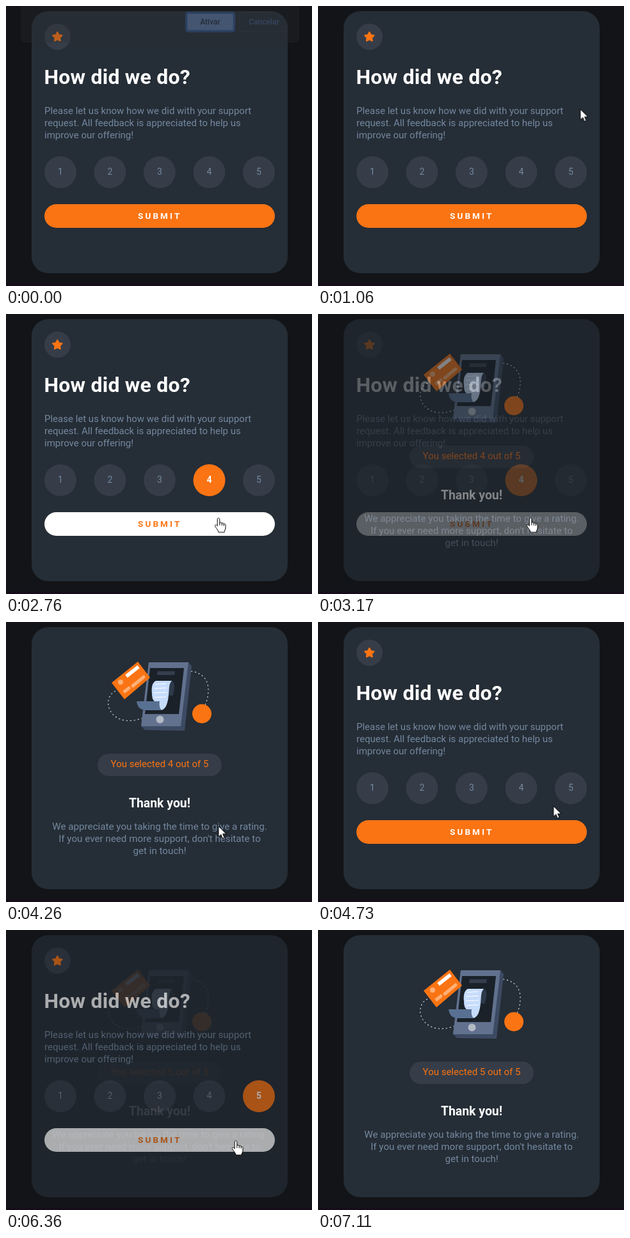
Recreate the animation shown at these times as an HTML page. Size 478x438 px, loop 7.52 s.

```html
<!DOCTYPE html>
<html lang="en">
<head>
<meta charset="utf-8">
<title>Rating card</title>
<style>
  html, body { margin: 0; width: 100%; height: 100%; overflow: hidden; background: #121417; }
  svg { display: block; width: 478px; height: 438px; font-family: Roboto, "Open Sans", sans-serif; font-size: 15px; }
  .card { fill: #252d36; }
  .chip { fill: #363d48; }
  .orange { fill: #fb7413; }
  .body { fill: #74889f; }
  .mid { text-anchor: middle; }
  .num { fill: #74889f; font-size: 14px; text-anchor: middle; }
  .bold { fill: #fff; font-weight: 700; }
  .peach { stroke: #ffb077; stroke-width: 5; stroke-linecap: round; }
  .dots { fill: none; stroke: #d5dde8; stroke-width: 1.1; stroke-dasharray: 2.2 3.8; }
  .pointer path { fill: #fff; stroke: #000; stroke-linejoin: round; }
  #thanks { opacity: 0; }
</style>
</head>
<body>
<svg viewBox="0 0 478 438">
  <rect width="478" height="438" fill="#121417"/>
  <rect y="434" width="478" height="4" fill="#180d1b"/>

  <g id="rating">
    <rect class="card" x="40" y="8" width="400" height="410" rx="26"/>
    <circle class="chip" cx="80.5" cy="48" r="20.5"/>
    <polygon id="star" class="orange" stroke="#fb7413" stroke-width="2" stroke-linejoin="round"/>
    <text class="bold" x="59.5" y="122" font-size="32" letter-spacing=".2">How did we do?</text>
    <g class="body">
      <text x="60" y="169">Please let us know how we did with your support</text>
      <text x="60" y="188">request. All feedback is appreciated to help us</text>
      <text x="60" y="207">improve our offering!</text>
    </g>
    <g id="scores"></g>
    <rect id="bar" class="orange" x="60" y="310" width="360" height="37" rx="18.5"/>
    <text id="label" class="bold" x="206" y="332.5" font-size="13.5" letter-spacing="3.1">SUBMIT</text>
  </g>

  <g id="thanks">
    <rect class="card" x="40" y="8" width="400" height="410" rx="26"/>
    <path class="dots" d="M171 108C160 113 157 127 162 137C169 152 188 160 214 150"/>
    <path class="dots" d="M289 77C307 79 316 91 316 106C316 116 314 123 311 130"/>
    <path fill="#3d4a63" d="M223 63H285L290 69L279 170L217 169L211 163Z"/>
    <path fill="#61718e" d="M223 63H285L273 163H211Z"/>
    <path fill="#1a2129" d="M225 72H278L270 144H217Z"/>
    <path fill="#343e4d" d="M237 77H264L263 83H236Z"/>
    <circle cx="240.5" cy="152.5" r="6" fill="#b2bac6"/>
    <path fill="#2d394a" d="M254 92C261 90 264 95 263 104L261 115H251Z"/>
    <path fill="#c6dcfb" d="M234 92H259C254 97 255 105 254 114C253 126 250 137 242 138H232V124C229 122 228 117 228 112C227 103 228 95 234 92Z"/>
    <path stroke="#fff" stroke-width="1.2" d="M233 97.5L250 96.5M231 104L251 103M231 111L251 110M232 118L250 117"/>
    <path fill="#587092" d="M204 124H240C239 130 240 135 243 138H219C210 138 205 133 204 124Z"/>
    <path class="orange" d="M165 95L206 62L225 87L185 121Z"/>
    <path stroke="#fff" stroke-width="5.5" d="M188 85L207 70"/>
    <circle cx="179" cy="94" r="4" fill="#ffb077"/>
    <path class="peach" d="M185.5 108.5L192 103.5M198 100L215 86"/>
    <circle class="orange" cx="306" cy="143.5" r="15"/>
    <rect class="chip" x="143" y="206" width="194" height="35" rx="17.5"/>
    <text id="pick4" class="orange mid" x="240" y="227">You selected 4 out of 5</text>
    <text id="pick5" class="orange mid" x="240" y="227">You selected 5 out of 5</text>
    <text class="bold mid" x="240" y="290" font-size="19.4">Thank you!</text>
    <g class="body mid" font-size="15.2">
      <text x="240" y="325">We appreciate you taking the time to give a rating.</text>
      <text x="240" y="344">If you ever need more support, don't hesitate to</text>
      <text x="240" y="363">get in touch!</text>
    </g>
  </g>

  <g id="dialog" font-size="12" text-anchor="middle">
    <rect x="23" y="-8" width="435" height="65" rx="5" fill="#2c2d30"/>
    <rect x="281.5" y="10.5" width="75" height="29" rx="3" fill="#8ab4f8" stroke="#3c6cc0" stroke-width="3.5"/>
    <text x="319" y="29" fill="#202a40" font-weight="500">Ativar</text>
    <rect x="365" y="10" width="75" height="30" rx="3" fill="none" stroke="#3b4048"/>
    <text x="403" y="29" fill="#5a80c8" font-weight="500">Cancelar</text>
  </g>

  <g id="cursor" class="pointer">
    <path id="arrow" d="M0 0V16.5L3.8 13L6.4 19L9.2 17.8L6.6 12H12Z"/>
    <g id="hand">
      <path d="M-1.8 1.5C-1.8-.8 1.8-.8 1.8 1.5V7C3 6 5 6.3 5.2 8C6.5 7 8 7.5 8.2 9C9.6 8.2 11 9 11 10.5V15C11 18 9 19 9 22H0C0 19-3 16.5-5.5 12.5C-6.5 10.5-4 9.5-2.8 11L-1.8 12.2Z"/>
      <path d="M1.8 7V11M5.2 8V11.5M8.2 9V12"/>
    </g>
  </g>
</svg>

<script>
const LOOP = 7520, RESET = 4390;
const GREY = '#363d48', INK = '#74889f', ORANGE = '#fb7413', WHITE = '#ffffff';
const $ = id => document.getElementById(id);

// rows: [time in ms, value, easing to the next row]
function track(el, prop, rows) {
  const last = rows[rows.length - 1];
  const frames = [...rows, [LOOP, last[1]]].map(([t, v, easing = 'linear']) =>
    ({ offset: t / LOOP, [prop]: v, easing }));
  el.animate(frames, { duration: LOOP, iterations: Infinity });
}

const steps = (el, prop, rows) => track(el, prop, rows.map(([t, v]) => [t, v, 'step-end']));

$('star').setAttribute('points', Array.from({ length: 10 }, (_, i) => {
  const r = i % 2 ? 4 : 7.6, a = (i / 5 - .5) * Math.PI;
  return [80.3 + r * Math.cos(a), 48.4 + r * Math.sin(a)].map(n => n.toFixed(2));
}).join(' '));

$('scores').innerHTML = [1, 2, 3, 4, 5].map(n => {
  const x = 7.5 + 77.5 * n;
  return `<circle id="dot${n}" class="chip" cx="${x}" cy="260" r="25"/>
    <text id="num${n}" class="num" x="${x}" y="263.5">${n}</text>`;
}).join('');

function select(n, start, end, reset) {
  const lit = (el, prop, off, on) => track(el, prop, [
    [0, off], [start, off, 'ease'], [end, on, 'step-end'], ...(reset ? [[reset, off]] : [])
  ]);
  lit($('dot' + n), 'fill', GREY, ORANGE);
  lit($('num' + n), 'fill', INK, WHITE);
  lit($('num' + n), 'fontWeight', 400, 700);
}
select(4, 1480, 1690, RESET);
select(5, 4820, 5010);

function hover(el, off, on) {
  track(el, 'fill', [
    [0, off], [2470, off, 'ease'], [2760, on, 'step-end'],
    [RESET, off], [5790, off, 'ease'], [6090, on]
  ]);
}
hover($('bar'), ORANGE, WHITE);
hover($('label'), WHITE, ORANGE);

// Cross-fade between the two cards: [ms after the click, rating, thanks]
const fade = [[0, 1, 0], [170, .72, .1], [300, .5, .45], [480, .18, .84], [690, 0, 1]];
function cross(el, col) {
  const run = start => fade.map(f => [start + f[0], f[col]]);
  const first = run(2870);
  first[first.length - 1].push('step-end');
  track(el, 'opacity', [[0, fade[0][col]], ...first, [RESET, fade[0][col]], ...run(6190)]);
}
cross($('rating'), 1);
cross($('thanks'), 2);

steps($('pick4'), 'opacity', [[0, 1], [RESET, 0]]);
steps($('pick5'), 'opacity', [[0, 0], [RESET, 1]]);
track($('dialog'), 'opacity', [[0, .3], [60, .28], [220, 0]]);

const path = [
  [0, 490, 95], [640, 490, 95], [830, 452, 112], [1530, 324, 262],
  [1830, 324, 262], [2160, 334, 297], [2560, 332, 319.5], [4390, 332, 319.5],
  [5000, 396, 263], [5140, 396, 263], [5480, 388, 287], [5880, 359, 330],
  [6590, 359, 330], [6970, 452, 312], [7100, 481, 309]
];
track($('cursor'), 'transform', path.map(([t, x, y]) => [t, `translate(${x}px, ${y}px)`]));

const hands = [[1470, 1980], [2430, 3500], [4830, 5400], [5740, 6620]];
const toggle = (on, off) => [[0, off], ...hands.flatMap(([a, b]) => [[a, on], [b, off]])];
steps($('hand'), 'opacity', toggle(1, 0));
steps($('arrow'), 'opacity', toggle(0, 1));
</script>
</body>
</html>
```
